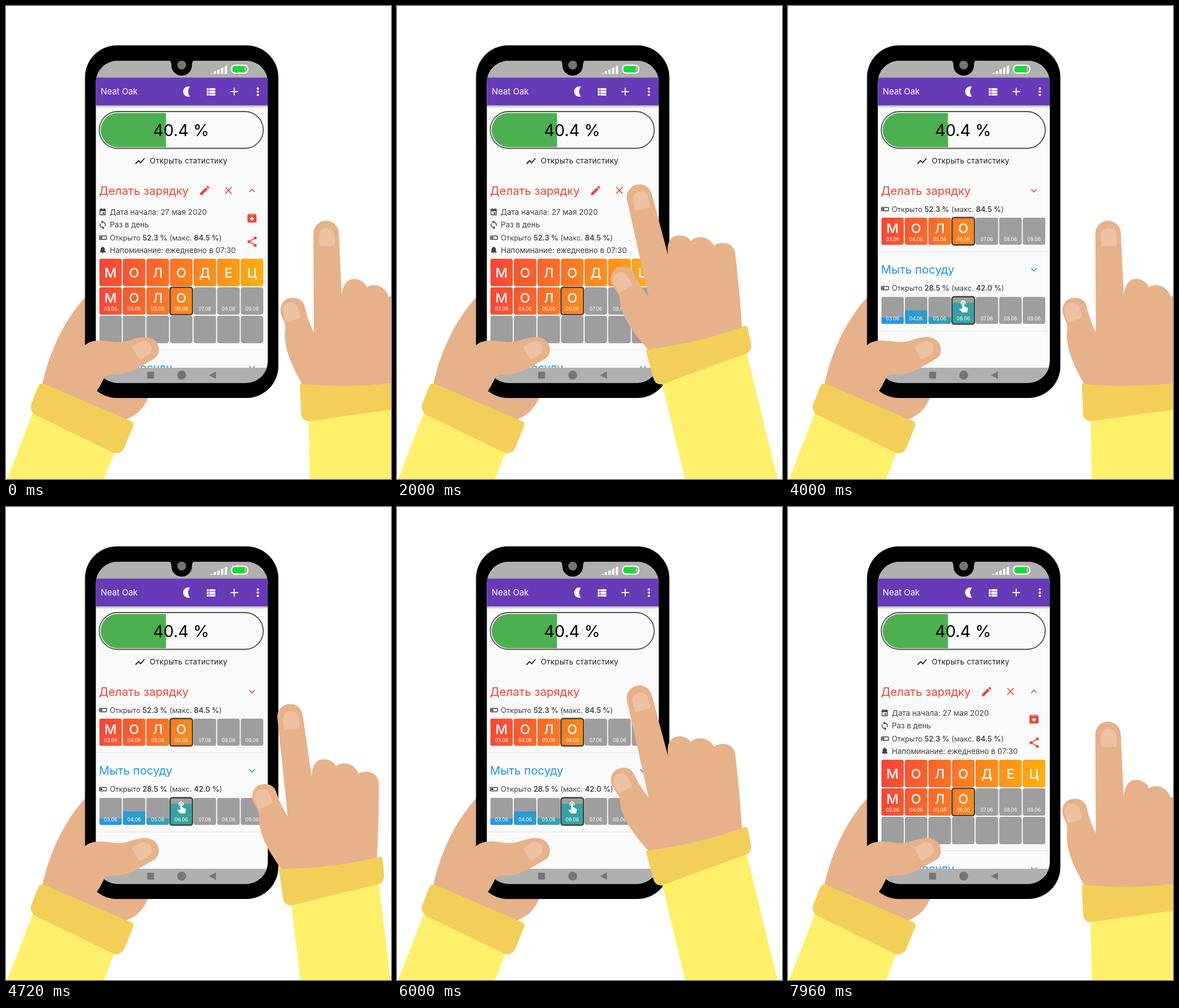
An HTML page for the animation above (8000 ms loop, 675 px wide and 829 px high).

```html
<!DOCTYPE html>
<html lang="ru">
<head>
<meta charset="utf-8">
<style>
  html, body { margin: 0; width: 100%; height: 100%; overflow: hidden; background: #fff; }
  svg { display: block; }
  text { font-family: Inter, Roboto, sans-serif; white-space: pre; }
  .meta { font-size: 13.3px; fill: #424242; }
  .bold { font-weight: 600; }
  .heading { font-size: 20.2px; }
  .letter { font-size: 23.5px; font-weight: 500; fill: #fff; text-anchor: middle; }
  .date { font-size: 8.6px; fill: #fff; text-anchor: middle; }
  .line { fill: none; stroke: currentColor; stroke-width: 1.8; }
  .small { color: #424242; fill: #424242; }
  .red { color: #f44336; fill: #f44336; }
  .blue { color: #2196f3; fill: #2196f3; }
  .skin { fill: #e7b18a; }
  .nail { fill: #edc1a1; }
  .cuff { fill: #f3cf59; }
  .sleeve { fill: #fff06b; }
</style>
</head>
<body>
<svg width="675" height="829" viewBox="0 0 675 829">
  <defs>
    <linearGradient id="warm" gradientUnits="userSpaceOnUse" x1="0" y1="0" x2="288" y2="48">
      <stop stop-color="#f94338"/><stop offset="1" stop-color="#ffb00c"/>
    </linearGradient>
    <linearGradient id="warmShort" gradientUnits="userSpaceOnUse" x1="0" y1="0" x2="245" y2="48">
      <stop stop-color="#f94338"/><stop offset="1" stop-color="#ffb00c"/>
    </linearGradient>
    <linearGradient id="cool" gradientUnits="userSpaceOnUse" x1="0" y1="0" x2="288" y2="48">
      <stop stop-color="#2196f3"/><stop offset="1" stop-color="#4caf50"/>
    </linearGradient>
    <linearGradient id="shade" x2="0" y2="1">
      <stop stop-color="#000" stop-opacity=".3"/><stop offset="1" stop-color="#000" stop-opacity="0"/>
    </linearGradient>
    <clipPath id="screen"><rect x="157.500" y="96" width="301.500" height="564.500" rx="38"/></clipPath>
    <clipPath id="pill"><rect x="166" y="187.500" width="283" height="60" rx="30"/></clipPath>
    <clipPath id="tileShape"></clipPath>
    <path id="nail" d="M-14-2A14 14 0 0 1 14-2V12Q14 16 10 16H-10Q-14 16-14 12Z"/>
  </defs>

  <!-- left arm behind the phone -->
  <path class="sleeve" d="M49 708L2 829H172L192 778Z"/>
  <path class="skin" d="M142 507C108 543 78 597 64 662L60 700L212 750V724C235 715 243 700 250 685L200 660L142 600Z"/>

  <rect x="138.500" y="69" width="339" height="618" rx="56"/>
  <g clip-path="url(#screen)">
    <rect x="157" y="96" width="302" height="565" fill="#fafafa"/>
    <g id="content"></g>

    <rect x="157" y="174" width="302" height="5" fill="url(#shade)"/>
    <rect x="157" y="125" width="302" height="49" fill="#673ab7"/>
    <text x="166" y="155.300" font-size="14.800" fill="#fff">Neat Oak</text>
    <g fill="#fff" color="#fff">
      <path d="M322.500 141.500a9 9 0 1 0 0 17a13 13 0 0 1 0-17z"/>
      <path d="M352 144h3.500v3.700h-3.500zm0 4.700h3.500v3.700h-3.500zm0 4.700h3.500v3.700h-3.500zM356.500 144h10.500v3.700h-10.500zm0 4.700h10.500v3.700h-10.500zm0 4.700h10.500v3.700h-10.500z"/>
      <path class="line" d="M393.500 150h13.500M400.200 143.200v13.500"/>
      <circle cx="441.500" cy="144.500" r="2"/><circle cx="441.500" cy="150" r="2"/><circle cx="441.500" cy="155.700" r="2"/>
    </g>

    <rect x="157" y="96" width="302" height="29.500" fill="#b0b0b0"/>
    <path d="M285 95Q290 96 290 104A18 18 0 0 0 326 104Q326 96 331 95Z"/>
    <circle cx="308" cy="103.500" r="7.800" fill="#757575"/>
    <path fill="#fff" d="M357 119l5-2v2zM364 119v-4l4-1.500v5.500zM370.500 119v-7l4-1.500v8.500zM377 119v-10l4-1.800v11.800zM383.500 119v-13l4-2v15z"/>
    <rect x="395.500" y="103.800" width="28.500" height="14" rx="6" fill="#b0b0b0" stroke="#fff" stroke-width="2"/>
    <path fill="#10e030" d="M401 105.500H418V116H401Q397 116 397 112V109.500Q397 105.500 401 105.500Z"/>

    <rect x="157" y="634" width="302" height="27" fill="#b0b0b0"/>
    <g fill="#757575">
      <rect x="247.500" y="641" width="12" height="12" rx="1"/>
      <circle cx="308" cy="647" r="7.800"/>
      <path d="M356 647L368 640.500V653.500Z"/>
    </g>
  </g>

  <!-- left thumb in front of the phone -->
  <path class="skin" d="M128 605L139 594C152 583 172 586 192 589C214 590 226 580 243 580C258 580 268 590 268 602C268 614 262 617 255 621C235 632 215 646 190 646C178 646 176 646 172 652C167 662 163 670 159 675L138 690L118 640Z"/>
  <use href="#nail" class="nail" transform="translate(240.500 601.500) rotate(60) scale(.95)"/>
  <path class="cuff" d="M66 662L220 728Q225 730 223 736L208 773Q202 787 188 783L52 717Q41 710 44 698L56 668Q59 660 66 662Z"/>

  <g id="hand">
    <path class="sleeve" d="M462 650L546 1000H709L612 604Z"/>
    <path class="skin" d="M440 602C412 570 394 545 391 516C390 507 387 503 381 495C371 483 374 463 388 459C401 454 411 459 415 467C422 481 428 493 441 509L403.500 341A22 22 0 0 1 446.500 329L475 436C473 418 477 403 494 402C506 402 512 407 515 412C525 402 545 402 556 420C570 411 590 415 593 433C598 475 602 520 605 567L600 595L455 625Z"/>
    <use href="#nail" class="nail" transform="translate(427.500 341) rotate(-13)"/>
    <use href="#nail" class="nail" transform="translate(393.500 482) rotate(-30) scale(.98)"/>
    <path class="cuff" d="M438 602Q530 591 609 561Q614 560 615 565L621 593Q622 605 613 609Q540 635 469 662Q453 667 449 651L437 606Q436 602 438 602Z"/>
  </g>
</svg>

<script>
const $ = id => document.getElementById(id);
const PITCH = 41.35, TILE = 39.5, HEIGHT = 48;

const label = (x, y, cls, str) => `<text x="${x}" y="${y}" class="${cls}">${str}</text>`;
const chevron = (y, dir) => `<path class="line" d="M426.500 ${y - 2.5 * dir}l4.800 ${5 * dir}l4.800 ${-5 * dir}"/>`;
const divider = y => `<path d="M157 ${y}.5H459" stroke="#e4e4e4"/>`;

$('tileShape').innerHTML = Array.from({ length: 7 }, (_, i) =>
  `<rect x="${i * PITCH}" width="${TILE}" height="${HEIGHT}" rx="4"/>`).join('');

// levels: filled height of each tile, 0 to 1
function row(y, { word = '', levels = [], paint = 'warm', dates = false, active = -1 }) {
  let fills = '', marks = '';
  for (let i = 0; i < 7; i++) {
    const mid = i * PITCH + TILE / 2, level = levels[i] || 0;
    fills += `<rect x="${i * PITCH}" y="${HEIGHT * (1 - level)}" width="${TILE}" height="${HEIGHT * level}" fill="url(#${paint})"/>`;
    if (word[i]) marks += label(mid, dates ? 27 : 32.5, 'letter', word[i]);
    if (dates) marks += label(mid, 41, 'date', `0${i + 3}.06`);
    if (i === active) marks += `<rect x="${i * PITCH}" y="0" width="${TILE}" height="${HEIGHT}" rx="4" fill="none" stroke="#424242" stroke-width="2.500"/>`;
  }
  return `<g transform="translate(163.500 ${y})"><g clip-path="url(#tileShape)">
    <rect width="290" height="${HEIGHT}" fill="#9e9e9e"/>${fills}</g>${marks}</g>`;
}

const currentWeek = y => row(y, { word: 'МОЛО', levels: [1, 1, 1, 1], paint: 'warmShort', dates: true, active: 3 });

function score(y, now, best) {
  return `<g class="small"><rect class="line" x="163.700" y="${y - 7.5}" width="12.600" height="6" rx="1" style="stroke-width:1.4"/>
    <rect x="165" y="${y - 6}" width="4" height="3"/></g>
    <text x="182" y="${y}" class="meta" style="font-size:12.8px">Открыто <tspan class="bold">${now} %</tspan> (макс. <tspan class="bold">${best} %</tspan>)</text>`;
}

const summary = `
  <rect x="163.500" y="185" width="287.500" height="64.500" rx="32.200" fill="#fafafa" stroke="#505050" stroke-width="1.800"/>
  <rect x="166" y="187" width="114.500" height="61" fill="#4caf50" clip-path="url(#pill)"/>
  <text x="307" y="228.300" font-size="28.500" text-anchor="middle">40.4 %</text>
  <path class="line" d="M227 276.500l5.500-5.500 3.700 3.700 6.600-7.700" color="#212121"/>
  <text x="252" y="276" font-size="13.300" letter-spacing=".27" fill="#212121">Открыть статистику</text>
  <g class="red">${label(163, 331, 'heading', 'Делать зарядку')}</g>`;

const expanded = `
  <g class="red">
    <path transform="translate(337.500 312.500) scale(.9)" d="M3 17.250V21h3.750L17.810 9.940l-3.750-3.750zM20.710 7.040a1 1 0 0 0 0-1.410l-2.340-2.340a1 1 0 0 0-1.410 0l-1.830 1.830 3.750 3.750z"/>
    <path class="line" d="M384.500 317.500l11 11.500M395.500 317.500l-11 11.500"/>
    ${chevron(323.5, -1)}
    <path fill-rule="evenodd" d="M425.500 364H437L439.200 366.500V378Q439.200 379.500 437.500 379.500H425Q423.300 379.500 423.300 378V366.500ZM425.500 365.700H437L436.500 365H426ZM431.200 376.500L436 371.700H433V370H429.500V371.700H426.500Z"/>
    <path class="line" d="M437 406.500L426 413L437 419.500" style="stroke-width:1.5"/>
    <circle cx="437" cy="406.500" r="2.600"/><circle cx="426" cy="413" r="2.600"/><circle cx="437" cy="419.500" r="2.600"/>
  </g>
  <g class="small">
    <rect class="line" x="164.800" y="356.500" width="9.500" height="9.500" rx="1" style="stroke-width:1.3"/>
    <path d="M164.500 356h10v3.500h-10zM166 354.500h1.500v2h-1.500zM171.500 354.500h1.500v2h-1.500zM169.500 361.500h3v3h-3z"/>
    <path class="line" style="stroke-width:1.4" d="M168 378.500h1.500a5 5 0 0 1 4 7.500M171 388.500h-1.500a5 5 0 0 1-4-7.500"/>
    <path d="M169.500 375.500v6l-3-3zM169.500 385.500v6l3-3z"/>
    <path d="M164.500 432v-1l1.300-1.300v-3q0-3.200 2.800-4v-.5q1-1.500 2 0v.5q2.800.8 2.800 4v3l1.300 1.300v1zM168.200 432.800h2.800q-1.400 2.400-2.800 0z"/>
  </g>
  ${label(182, 365.5, 'meta', 'Дата начала: 27 мая 2020')}
  ${label(182, 388, 'meta', 'Раз в день')}
  ${score(410.5, '52.3', '84.5')}
  ${label(182, 432.5, 'meta', 'Напоминание: ежедневно в 07:30')}
  ${row(443, { word: 'МОЛОДЕЦ', levels: Array(7).fill(1) })}
  ${currentWeek(493)}
  ${row(543, {})}`;

const collapsed = `
  <g class="red">${chevron(323.5, 1)}</g>
  ${score(360.5, '52.3', '84.5')}
  ${currentWeek(370.7)}`;

const second = `
  ${divider(430)}
  <g class="blue">${label(163, 469, 'heading', 'Мыть посуду')}${chevron(462, 1)}</g>
  ${score(499, '28.5', '42.0')}
  ${row(509.5, { levels: [.24, .5, .25, .78], paint: 'cool', dates: true, active: 3 })}
  <g fill="#fff" transform="translate(295.500 513)">
    <path d="M9 11.240V7.500a2.500 2.500 0 0 1 5 0v3.740a4.500 4.500 0 1 0-5 0z"/>
    <path d="M18.840 15.870l-4.540-2.260-.54-.11H13v-6a1.500 1.500 0 0 0-3 0v10.740l-3.430-.72q-.6-.1-1.030.3l-.79.8 4.940 4.940q.4.440 1.060.44h6.790q1.200 0 1.440-1.280l.75-5.270q.1-1.100-.89-1.580z"/>
  </g>
  ${divider(569)}`;

$('content').innerHTML = `${summary}<g id="expanded">${expanded}</g><g id="collapsed">${collapsed}</g><g id="second">${second}</g>`;

// Brisk start, soft landing
const ease = u => 1.15 * u * (1 - u) ** 2 + u * u * (3 - 2 * u);

function reach(t) {
  if (t < 2000) return ease(t / 2000);
  if (t < 2400) return 1;
  return 1 - ease((t - 2400) / 1600);
}

function draw(now) {
  const t = Math.floor(now / 40) * 40 % 8000;
  const open = t < 2200 || t >= 6200;
  const away = 1 - reach(t % 4000);
  $('expanded').style.display = open ? '' : 'none';
  $('collapsed').style.display = open ? 'none' : '';
  $('second').setAttribute('transform', `translate(0 ${open ? 172 : 0})`);
  $('hand').setAttribute('transform', `translate(${79.5 * away} ${60 * away}) rotate(${12.3 * away} 437 600)`);
}

const start = performance.now();
function tick() {
  draw(performance.now() - start);
  requestAnimationFrame(tick);
}
tick();
</script>
</body>
</html>
```
